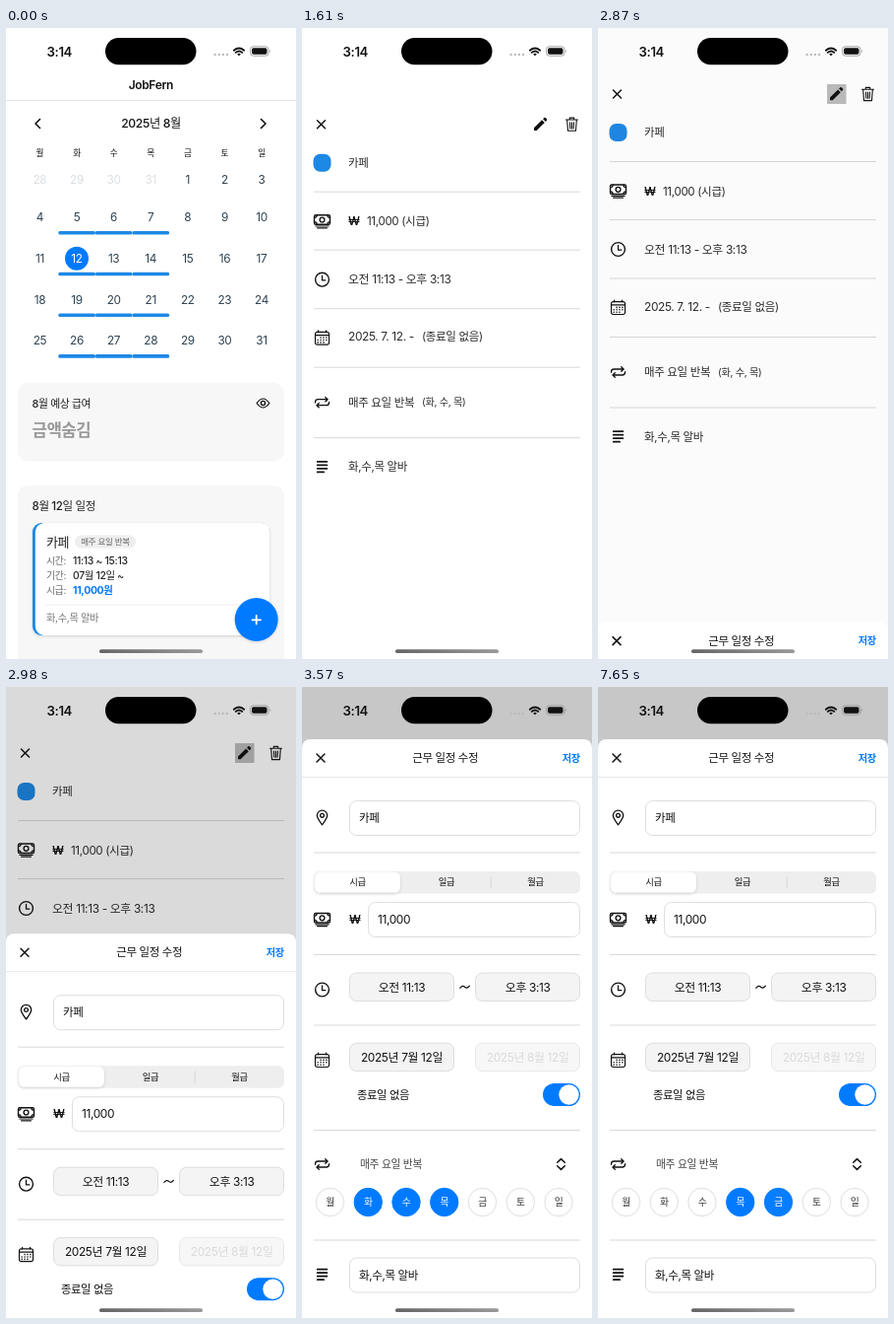
Write an HTML page that moves like this. It is 295 px wide and 640 px high and loops after 8000 ms.

```html
<!DOCTYPE html>
<html lang="ko">
<head>
<meta charset="utf-8">
<title>JobFern</title>
<style>
  html, body { margin: 0; height: 100%; overflow: hidden; background: #fff; }
  svg { display: block; width: 100vw; height: 100vh; }
  text {
    font-family: Inter, "Noto Sans CJK KR", "Noto Sans CJK", sans-serif;
    letter-spacing: -.03em;
    white-space: pre;
  }
</style>
</head>
<body>
<svg id="stage" viewBox="0 0 295 640"></svg>
<script>
const BLUE = '#007aff', MARK = '#1e88e5', INK = '#111', EDGE = '#dedede';
const DAYS = [...'월화수목금토일'];

// y is the vertical middle of the line
const text = (x, y, s, size, fill = INK, weight = 400, anchor = 'start') =>
  `<text x="${x}" y="${y + size * .36}" font-size="${size}" fill="${fill}" font-weight="${weight}" text-anchor="${anchor}">${s}</text>`;
const mid = (x, y, s, size, fill, weight) => text(x, y, s, size, fill, weight, 'middle');
const rect = (x, y, w, h, r, fill, more = '') =>
  `<rect x="${x}" y="${y}" width="${w}" height="${h}" rx="${r}" fill="${fill}" ${more}/>`;
const disc = (x, y, r, fill, more = '') => `<circle cx="${x}" cy="${y}" r="${r}" fill="${fill}" ${more}/>`;
const path = (d, w = 1.4, color = INK) =>
  `<path d="${d}" fill="none" stroke="${color}" stroke-width="${w}" stroke-linecap="round" stroke-linejoin="round"/>`;
const solid = (d, fill = INK) => `<path d="${d}" fill="${fill}"/>`;
const rule = (y, x1 = 12, x2 = 283, color = '#d9d9d9') =>
  `<path d="M${x1} ${y}H${x2}" stroke="${color}" stroke-width="1"/>`;
const at = (x, y, body) => `<g transform="translate(${x} ${y})">${body}</g>`;
const group = (id, body) => `<g id="${id}">${body}</g>`;
const field = (x, y, w, h, fill = '#fff') => rect(x, y, w, h, 7, fill, `stroke="${EDGE}"`);

const ring = 'stroke="#111" stroke-width="1.4"';
const icon = {
  close: path('M-4-4L4 4M4-4L-4 4', 1.5),
  pencil: solid('M-6.3 6.3V3.6L1.8-4.5 4.5-1.8-3.6 6.3zM2.8-5.5L4-6.7q.7-.6 1.4 0L6.7-5.4q.6.7 0 1.4L5.5-2.8z'),
  trash: path('M-6-4.7H6M-2.2-4.9V-6.6H2.2V-4.9M-4.8-4.5L-4 6.6H4L4.8-4.5M-2-2L-1.7 4.3M0-2V4.3M2-2L1.7 4.3', 1.1),
  money: rect(-8, -6, 16, 9.5, 1.5, 'none', ring) + disc(0, -1.2, 2.4, 'none', ring) +
    path('M-8-3.3Q-5.3-3.3-5.3-6M8-3.3Q5.3-3.3 5.3-6M-8 .9Q-5.3.9-5.3 3.5M8 .9Q5.3.9 5.3 3.5', 1.1) +
    path('M-6.6 5.3H6.6M-5 7.1H5', 1.2),
  clock: disc(0, 0, 6.9, 'none', ring) + path('M0-4V.7H3.3', 1.3),
  calendar: rect(-7, -5.8, 14, 12.8, 2, 'none', 'stroke="#111" stroke-width="1.2"') +
    path('M-7-2.6H7M-4-7.4V-5.8M4-7.4V-5.8', 1.2) +
    [0, 1, 2].map(r => [0, 1, 2, 3].map(c =>
      r == 0 && c == 0 || r == 2 && c == 3 ? '' : disc(c * 2.9 - 4.35, r * 2.4 - .1, .8, INK)).join('')).join(''),
  repeat: ['', ' transform="rotate(180)"'].map(r =>
    `<g${r}>${path('M-7 .3V-.3Q-7-3-4.2-3H5.4M3.2-5.2L5.6-3 3.2-.8', 1.3)}</g>`).join(''),
  lines: path('M-4.8-5.3H4.8M-4.8-1.8H4.8M-4.8 1.7H4.8M-4.8 5.2H1.6', 1.8),
  pin: path('M0 7.2C-2.6 3.7-5.2.6-5.2-2.2A5.2 5.2 0 0 1 5.2-2.2C5.2.6 2.6 3.7 0 7.2z', 1.3) +
    disc(0, -2.2, 1.9, 'none', ring),
  eye: path('M-6.4 0Q0-9 6.4 0Q0 9-6.4 0z', 1.2) + disc(0, 0, 2.1, 'none', ring),
  sort: path('M-3.8-1.7L0-5.4 3.8-1.7M-3.8 1.7L0 5.4 3.8 1.7', 1.5)
};

function calendar() {
  const col = i => 34.4 + i * 37.6;
  let s = mid(147.3, 57.5, 'JobFern', 12, INK, 600) + rule(73.5, 0, 295, '#e4e4e4') +
    path('M34.5 92.5L30 97 34.5 101.5M259.5 92.5L264 97 259.5 101.5', 1.6) +
    mid(147.5, 97, '2025년 8월', 12.2, INK, 500);
  DAYS.forEach((d, i) => s += mid(col(i), 127, d, 8.6, INK, 500));
  for (let k = 0; k < 35; k++) {
    const row = Math.floor(k / 7), c = k % 7, x = col(c);
    const y = row ? 150.3 + row * 41.7 : 154, today = k == 15;
    if (today) s += disc(x, y, 12, BLUE);
    s += mid(x, y, k < 4 ? 28 + k : k - 3, 11.8, today ? '#fff' : k < 4 ? '#dcdfe2' : '#2d4150');
    if (row && c > 0 && c < 4) s += rect(x - 18.7, y + 14, 37.6, 3.6, 1.5, MARK);
  }
  s += rect(12, 360, 271, 79.5, 10, '#f7f7f7') +
    text(26.5, 381, '8월 예상 급여', 10.8, '#222', 500) + at(261.5, 380.5, icon.eye) +
    text(26.5, 408, '금액숨김', 16.8, '#999', 700) +
    rect(12, 464, 271, 190, 10, '#f7f7f7') + text(26.5, 485, '8월 12일 일정', 11.5, '#222', 500);
  const row = (y, label, value, color = '#222', weight = 500) =>
    text(41, y, label, 9.8, '#666') + text(68, y, value, 10.4, color, weight);
  s += group('card',
    rect(27, 502, 241, 114, 9, MARK, 'filter="url(#soft)"') +
    solid('M38 502H259Q268 502 268 511V607Q268 616 259 616H38Q29.8 614 29.8 606V512Q29.8 504 38 502z', '#fff') +
    text(41, 521, '카페', 13, '#222', 500) +
    rect(70, 514.5, 62, 13, 6.5, '#eee') + mid(101, 521, '매주 요일 반복', 8.5, '#666') +
    row(540, '시간:', '11:13 ~ 15:13') + row(555, '기간:', '07월 12일 ~') +
    row(570, '시급:', '11,000원', BLUE, 700) +
    rule(585, 41, 256, '#eee') + text(41, 598, '화,수,목 알바', 10.2, '#777'));
  return s + disc(254.7, 600, 22, BLUE, 'filter="url(#soft)"') +
    path('M254.7 596V604.6M250.4 600.3H259', 1.8, '#fff');
}

function detail() {
  const ink = '#2b2b2b', x = 20.5;
  return rect(0, 0, 295, 700, 0, '#fff') +
    at(19.5, 67, icon.close) + rect(233, 57, 19.5, 20, 0, '#bcbcbc', 'id="press"') +
    at(242.3, 67, icon.pencil) + at(274.5, 67, icon.trash) +
    rect(11.5, 97, 18, 18, 7, MARK) + text(47, 106, '카페', 11.5, ink) +
    [135.5, 194.5, 254, 313.5, 385].map(y => rule(y)).join('') +
    at(x, 165, icon.money) + text(47, 165.5, '₩', 11.8, INK, 600) + text(66, 165.5, '11,000 (시급)', 11.6, ink) +
    at(x, 224.5, icon.clock) + text(47, 224.5, '오전 11:13 - 오후 3:13', 11.9, ink) +
    at(x, 283.5, icon.calendar) + text(47, 282.5, '2025. 7. 12. -', 11.9, ink) + text(122, 282.5, '(종료일 없음)', 11.5, ink) +
    at(x, 349, icon.repeat) + text(47, 349, '매주 요일 반복', 11.5, ink) + text(122, 349, '(화, 수, 목)', 10.2, ink) +
    at(x, 414.5, icon.lines) + text(47, 414.5, '화,수,목 알바', 11.5, ink);
}

const dayX = i => 28.5 + i * 38.75;
function editor() {
  const x = 20.5;
  return '<path id="paper" fill="#fff"/>' +
    at(19, 72, icon.close) + mid(145.7, 72, '근무 일정 수정', 11.5, INK, 500) +
    text(264.8, 72, '저장', 10.2, BLUE, 700) + rule(91.5, 0, 295, '#e6e6e6') +
    [168, 271.5, 343, 449.5, 561].map(y => rule(y)).join('') +
    at(x, 132.5, icon.pin) + field(48.5, 115.5, 234, 35) + text(58, 132.5, '카페', 11.5) +
    rect(12, 187, 271, 22.5, 6, '#eeeeef') +
    rect(12.8, 187.6, 87, 21.3, 6, '#fff', 'filter="url(#soft)"') + rule(209, 18, 95, '#e2e2e2') +
    path('M192.3 192.5V204', .8, '#d4d4d4') +
    mid(56.5, 198, '시급', 9.4, INK, 500) + mid(147, 198, '일급', 9.4) + mid(237.5, 198, '월급', 9.4) +
    at(x, 235.5, icon.money) + text(48, 236, '₩', 11.8, INK, 600) +
    field(67.5, 218.5, 215, 35) + text(77, 236, '11,000', 11.9) +
    at(x, 307, icon.clock) + field(48.5, 290, 106, 28.5, '#f4f4f4') + field(176.5, 290, 106, 28.5, '#f4f4f4') +
    mid(101.5, 304.3, '오전 11:13', 11.9) + mid(229.7, 304.3, '오후 3:13', 11.9) +
    path('M160.8 305.3Q163.3 302 165.6 304.2T170.4 303.2', 1.2) +
    at(x, 378.5, icon.calendar) + field(48.5, 361.2, 106, 28.5, '#f4f4f4') + mid(101.5, 375.5, '2025년 7월 12일', 11.9) +
    `<g opacity=".7">${field(176.5, 361.2, 106, 28.5, '#f4f4f4')}</g>` + mid(229.7, 375.5, '2025년 8월 12일', 11.9, '#dadada') +
    text(56, 413.5, '종료일 없음', 11.3) + rect(245, 402, 38, 23, 11.5, BLUE) + disc(271.5, 413.5, 10.2, '#fff') +
    at(x, 484, icon.repeat) + text(59, 484, '매주 요일 반복', 10.8, '#444') + at(263.5, 484, icon.sort) +
    DAYS.map((d, i) => group('day' + i,
      disc(dayX(i), 522.5, 14.2, '#fff') + mid(dayX(i), 522.5, d, 9.8))).join('') +
    at(x, 596, icon.lines) + field(48.5, 579, 234, 35) + text(58, 596.5, '화,수,목 알바', 11.5);
}

function system() {
  return mid(54.3, 24, '3:14', 13.2, INK, 600) + rect(101, 10, 92.5, 27.3, 13.6, '#000') +
    [0, 1, 2, 3].map(i => disc(212.6 + i * 4.1, 27, 1.2, '#bbb')).join('') +
    at(237, 27.3, path('M-5.2-4.6Q0-9 5.2-4.6M-3.3-2.4Q0-5.2 3.3-2.4', 1.8) + solid('M-1.9-.9Q0-2.4 1.9-.9L0 1z')) +
    rect(248.5, 18.8, 18.5, 9.4, 3, 'none', 'stroke="#999" stroke-width=".9"') +
    rect(250, 20.2, 15.5, 6.6, 1.8, INK) + solid('M268.4 22Q270.2 23.5 268.4 25z', '#999') +
    rect(95, 630.3, 105, 3.8, 1.9, 'url(#bar)');
}

const stage = document.getElementById('stage');
stage.innerHTML = `<defs>
  <filter id="soft" x="-20%" y="-20%" width="140%" height="150%">
    <feDropShadow dx="0" dy="1" stdDeviation="1.8" flood-opacity=".16"/></filter>
  <linearGradient id="bar"><stop stop-color="#666"/><stop offset="1" stop-color="#999"/></linearGradient>
  </defs>` + group('home', calendar()) + group('detail', detail()) +
  rect(0, 0, 295, 640, 0, '#000', 'id="dim"') + group('editor', editor()) + system();

const $ = id => document.getElementById(id);
const LOOP = 8000;
const TICKS = [0, 1180, 1290, 1400, 1510, 1610, 1710, 1830, 2080, 2750, 2870, 2980, 3100, 3210,
  3320, 3570, 5830, 5940, 6040, 6480, 6590, 6710, 7430, 7540, 7650];
const TAPS = { 1: 5830, 2: 6480, 4: 7430 };

// critically damped spring: 1 at the start, settling to 0
const spring = (t, start) => {
  const k = Math.max(0, t - start) * .017;
  return (1 + k) * Math.exp(-k);
};
const slide = (id, y, shown) => {
  $(id).setAttribute('transform', `translate(0 ${y.toFixed(2)})`);
  $(id).style.display = shown ? '' : 'none';
};

function paintDay(i, t) {
  const since = t - (TAPS[i] ?? Infinity), toggled = since >= 60;
  const on = (i > 0 && i < 4) !== toggled;
  const p = Math.min(1, Math.max(0, (since - 60) / 200));
  const [dot, label] = $('day' + i).children;
  dot.setAttribute('fill', on ? BLUE : '#fff');
  dot.setAttribute('stroke', on ? BLUE : EDGE);
  label.setAttribute('fill', on ? '#fff' : '#333');
  $('day' + i).setAttribute('opacity', since < 0 ? 1 : .2 + .8 * p * (2 - p));
}

function draw(t) {
  const a = t >= 2080 ? 0 : spring(t, 1328), b = t >= 3570 ? 0 : spring(t, 2846);
  $('card').setAttribute('opacity', t < 1180 ? 1 : .5);
  slide('detail', 640 * a, t > 1328);
  $('press').setAttribute('opacity', t < 2750 ? 0 : 1);
  $('dim').setAttribute('opacity', .22 * (1 - b));
  slide('editor', 587 * b, t > 2846);
  const r = b ? 40 : 0;
  $('paper').setAttribute('d',
    `M0 62Q0 53 9 53H286Q295 53 295 62V${640 - r}A${r} ${r} 0 0 1 ${295 - r} 640H${r}A${r} ${r} 0 0 1 0 ${640 - r}z`);
  DAYS.forEach((_, i) => paintDay(i, t));
}

function frame() {
  const t = performance.now() % LOOP;
  draw(TICKS.findLast(k => k <= t));
  requestAnimationFrame(frame);
}
frame();
</script>
</body>
</html>
```
